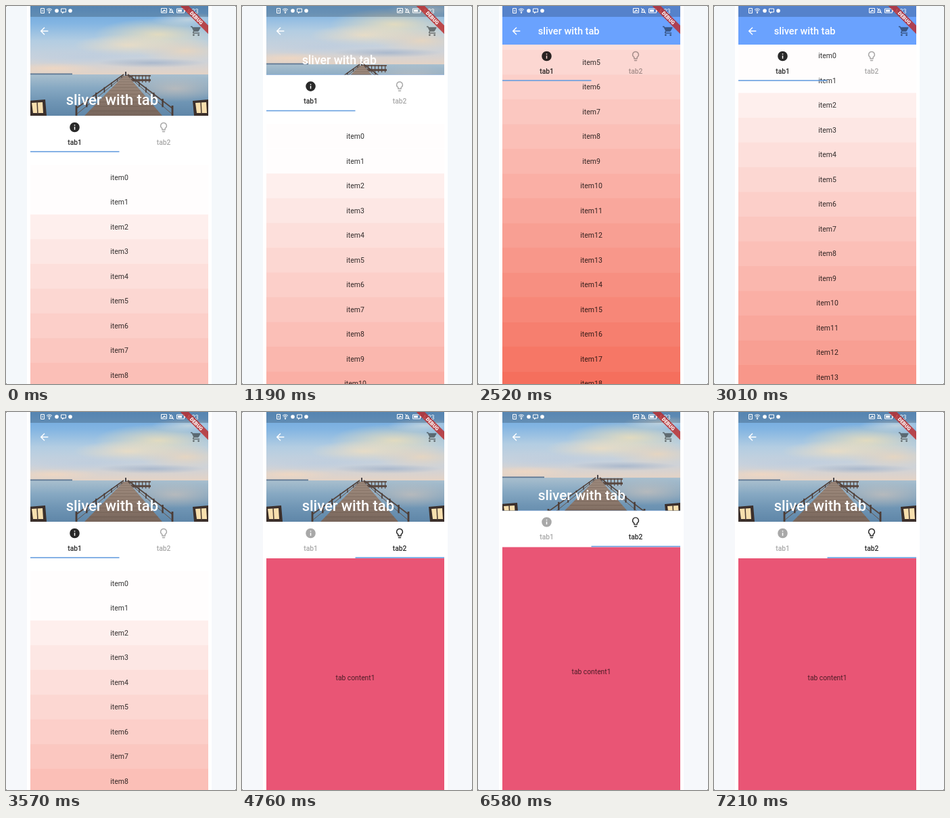
Recreate the animation shown at these times as an HTML page with a canvas. Size 340 by 558 pixels, loop 7.28 s.

```html
<!DOCTYPE html>
<html lang="en">
<head>
<meta charset="utf-8">
<title>Sliver with tab</title>
<style>
html, body { margin: 0; width: 100%; height: 100%; overflow: hidden; background: #f4f8fb; }
canvas { display: block; width: 340px; height: 558px; }
</style>
</head>
<body>
<canvas id="stage"></canvas>
<script>
const LOOP = 7280, W = 340, H = 558;
const L = 36, R = 299, PW = R - L;            // phone edges
const OPEN = 162, SHRINK = 105, TABS = 54, ROW = 36.5;
const FONT = 'Roboto, "Noto Sans", sans-serif';

const canvas = document.getElementById('stage');
const c = canvas.getContext('2d');
const dpr = window.devicePixelRatio || 1;
canvas.width = W * dpr;
canvas.height = H * dpr;

const icons = {
  back: 'M20 11H7.83l5.59-5.59L12 4l-8 8 8 8 1.41-1.41L7.83 13H20z',
  cart: 'M7 18a2 2 0 1 0 0 4 2 2 0 0 0 0-4zM1 2v2h2l3.6 7.59-1.35 2.45A2 2 0 0 0 7 17h12v-2H7.42a.25.25 0 0 1-.22-.37l.9-1.63h7.45c.75 0 1.41-.41 1.75-1.03l3.58-6.49A1 1 0 0 0 20 4H5.21l-.94-2zM17 18a2 2 0 1 0 0 4 2 2 0 0 0 0-4z',
  info: 'M12 2a10 10 0 1 0 0 20 10 10 0 0 0 0-20zM13 17h-2v-6h2zM13 9h-2V7h2z',
  bulb: 'M9 21c0 .55.45 1 1 1h4c.55 0 1-.45 1-1v-1H9zM12 2a7 7 0 0 0-4 12.74V17c0 .55.45 1 1 1h6c.55 0 1-.45 1-1v-2.26A7 7 0 0 0 12 2zM14.85 13.1l-.85.6V16h-4v-2.3l-.85-.6a5 5 0 1 1 5.7 0z'
};
for (const k in icons) icons[k] = new Path2D(icons[k]);

const clamp = (v, a = 0, b = 1) => Math.min(b, Math.max(a, v));
const mix = (a, b, t) => a + (b - a) * t;
const ease = t => t * t * (3 - 2 * t);

// [time, value] pairs, eased in between
function track(keys, t) {
  let [t0, v0] = keys[0];
  for (const [t1, v1] of keys) {
    if (t < t1) return mix(v0, v1, ease(clamp((t - t0) / (t1 - t0))));
    [t0, v0] = [t1, v1];
  }
  return v0;
}
const scrollKeys = [[800, 0], [1600, 125.5], [1750, 125.5], [2400, 352.5], [2580, 352.5],
  [3450, 0], [5230, 0], [5700, 159], [5900, 159], [6750, 0]];
const pageKeys = [[4300, 0], [4600, 1]];

function rect(x, y, w, h, fill) {
  c.fillStyle = fill;
  c.fillRect(x, y, w, h);
}
function poly(fill, ...pts) {
  c.fillStyle = fill;
  c.beginPath();
  for (let i = 0; i < pts.length; i += 2) c.lineTo(pts[i], pts[i + 1]);
  c.fill();
}
function line(color, width, ...pts) {
  c.strokeStyle = color;
  c.lineWidth = width;
  c.beginPath();
  for (let i = 0; i < pts.length; i += 2) c.lineTo(pts[i], pts[i + 1]);
  c.stroke();
}
function dot(x, y, r, fill) {
  c.fillStyle = fill;
  c.beginPath();
  c.arc(x, y, r, 0, 7);
  c.fill();
}
function text(str, x, y, size, weight, fill, align = 'center') {
  c.font = `${weight} ${size}px ${FONT}`;
  c.textAlign = align;
  c.fillStyle = fill;
  c.fillText(str, x, y);
}
function icon(name, x, y, fill) {
  c.save();
  c.translate(x, y);
  c.scale(.73, .73);
  c.translate(-12, -12);
  c.fillStyle = fill;
  c.fill(icons[name], 'evenodd');
  c.restore();
}
function clipTo(x, y, w, h, draw) {
  c.save();
  c.beginPath();
  c.rect(x, y, w, h);
  c.clip();
  draw();
  c.restore();
}
function gradient(y0, y1, ...stops) {
  const g = c.createLinearGradient(0, y0, 0, y1);
  stops.forEach((s, i) => g.addColorStop(i / (stops.length - 1), s));
  return g;
}
function cloud(x, y, rx, ry, rgb, a) {
  c.save();
  c.translate(x, y);
  c.scale(rx, ry);
  const g = c.createRadialGradient(0, 0, 0, 0, 0, 1);
  g.addColorStop(0, `rgba(${rgb},${a})`);
  g.addColorStop(1, `rgba(${rgb},0)`);
  dot(0, 0, 1, g);
  c.restore();
}

function lantern(x) {
  poly('#3b2f2b', x - 13, 140, x + 11, 138, x + 13, 162, x - 11, 162);
  poly('#f7dfae', x - 9, 143, x + 7, 142, x + 8, 158, x - 7, 158);
  line('#4a3a32', 1.5, x - 1, 141, x, 160);
}

function photo() {
  rect(L, 0, PW, 103, gradient(0, 103, '#6aa5dd', '#83b5e2', '#b3cde2', '#c9d2dc', '#e6d3c4'));
  cloud(225, 42, 95, 24, '247,226,180', .75);
  cloud(180, 58, 80, 16, '246,224,190', .7);
  cloud(265, 66, 70, 18, '238,214,186', .8);
  cloud(120, 75, 95, 13, '190,205,222', .8);
  cloud(70, 92, 70, 8, '246,216,190', .7);
  cloud(270, 20, 55, 10, '235,232,220', .6);
  cloud(215, 84, 80, 7, '133,160,196', .5);
  rect(L, 101, PW, 61, gradient(101, 162, '#a9bfce', '#86a8c2', '#6f95b4', '#5f86a8'));
  cloud(250, 122, 70, 20, '220,200,185', .55);
  rect(L, 99.5, 62, 1.8, '#5f7894');

  rect(178, 102, 36, 2, '#6b5a52');
  rect(180, 108, 34, 3, '#5d4c45');
  for (let x = 181; x < 215; x += 5) rect(x, 102, 1.2, 11, '#56463f');

  poly(gradient(103, 162, '#a08d80', '#8f7b6e', '#77655b'), 174, 103, 180, 103, 231, 162, 116, 162);
  for (let i = 1; i < 13; i++) {
    const k = (i / 13) ** 1.6;
    line('rgba(70,55,48,.35)', .7, mix(174, 116, k), 103 + 59 * k, mix(180, 231, k), 103 + 59 * k);
  }
  for (const [near, far] of [[104, 174], [246, 180]]) {
    line('#54443d', 1.6, far, 101, near, 151);
    line('#65534a', 1, far, 103, near, 160);
    for (let i = 1; i < 8; i++) {
      const k = (i / 7) ** 1.6, x = mix(far, near, k);
      line('#4b3c36', .8 + 2 * k, x, 101 + 46 * k, x, 104 + 58 * k);
    }
  }
  rect(176, 97, 2, 6, '#4a4548');
  lantern(47);
  lantern(289);
}

function list(x, top) {
  rect(x, top, PW, H, '#fff');
  for (let i = 0; i < 30; i++) {
    const y = top + 18.7 + i * ROW;
    if (y < -ROW || y > H) continue;
    const fill = i < 2 ? '#fffdfd' : `rgb(${255 - i * .55},${255 - i * 8},${255 - i * 9})`;
    rect(x, y, PW, ROW + .5, fill);
    text('item' + i, x + PW / 2, y + 21.9, 10.5, 400, 'rgba(0,0,0,.8)');
  }
}

function tabs(y, page, hidden) {
  const shade = k => `rgba(0,0,0,${mix(.34, .84, k)})`;
  const idle = hidden ? '#b0a8ab' : shade(1 - page);
  icon('info', 101.5, y + 17, idle);
  icon('bulb', 233, y + 17, shade(page));
  text('tab2', 233, y + 42.5, 10.25, 500, shade(page));
  c.globalAlpha = 1 - hidden;
  text('tab1', 101.5, y + 42.5, 10.25, 500, shade(1 - page));
  rect(L + page * PW / 2, y + 52.2, PW / 2, 1.6, '#68a0e0');
  c.globalAlpha = 1;
}

function statusBar() {
  rect(L, 0, PW, 16, 'rgba(0,0,0,.2)');
  c.lineJoin = 'round';
  c.strokeStyle = '#fff';
  c.lineWidth = 1;
  c.strokeRect(51.5, 3.5, 5, 7);
  rect(53.5, 5.5, 1, 3, '#fff');
  for (const r of [2, 4, 6]) {
    c.beginPath();
    c.arc(64, 10, r, -2.3, -.84);
    c.stroke();
  }
  dot(64, 10, 1, '#fff');
  dot(75, 7, 2.8, '#fff');
  c.strokeRect(81.5, 4, 7, 5);
  poly('#fff', 83, 9, 86, 9, 83, 11.5);
  dot(95, 7, 2.8, '#fff');

  c.strokeRect(229.5, 3.5, 8, 6.5);
  line('#fff', 1.2, 231, 9, 234, 6, 236, 8);
  line('#fff', 1, 241.5, 9.5, 242.5, 8, 242.5, 6, 244, 4, 246, 6, 246, 8, 247, 9.5, 241.5, 9.5);
  line('#fff', 1, 241, 3, 248, 11);
  c.strokeRect(252.5, 4, 11, 6);
  rect(254, 5.5, 6, 3, '#fff');
  rect(264, 6, 1.5, 2, '#fff');
  text('4:23', 276, 10.5, 9, 400, '#fff');
}

function banner() {
  c.save();
  c.translate(R, 0);
  c.rotate(Math.PI / 4);
  rect(-30, 20.4, 60, 8.8, 'rgba(190,40,40,.8)');
  text('DEBUG', 0, 27.4, 7.4, 900, '#fff');
  c.restore();
}

function header(h, p) {
  rect(L, 0, PW, h, '#6aa2fe');
  c.globalAlpha = 1 - clamp((p - .61) / .39);
  if (c.globalAlpha) clipTo(L, 0, PW, h, () => {
    c.translate(0, -26 * p);
    photo();
  });
  c.globalAlpha = 1;
  statusBar();
  icon('back', 56.5, 37, '#fff');
  icon('cart', 281, 37, 'rgba(0,0,0,.47)');
  const size = 14.6 * mix(1.5, 1, p);
  text('sliver with tab', 88.7, h - 11.7 - .2 * size, size, 500, '#fff', 'left');
}

function draw(t) {
  const scroll = track(scrollKeys, t), page = track(pageKeys, t);
  const p = clamp(scroll / SHRINK), h = OPEN - SHRINK * p;
  const top = OPEN + TABS - Math.min(scroll, SHRINK + TABS);
  const under = clamp((scroll - SHRINK) / TABS) * page;

  c.setTransform(dpr, 0, 0, dpr, 0, 0);
  rect(0, 0, W, H, t < 3150 ? '#f4f8fb' : '#f6f8fb');
  rect(31, 0, 273, H, '#fff');
  for (const x of [0, W - 1]) for (const y of [0, H - 1]) rect(x, y, 1, 1, '#777');

  clipTo(L, 0, PW, H, () => {
    if (page < 1) list(L - page * PW, OPEN + TABS - scroll);
    if (page > 0) {
      const x = L + (1 - page) * PW;
      rect(x, top, PW, H - top, '#e95575');
      text('tab content1', x + PW / 2, (top + 568) / 2 + 3.6, 10.3, 400,
        `rgba(0,0,0,${mix(.68, .5, under)})`);
    }
    tabs(h, page, under);
    header(h, p);
    banner();
  });
}

let start;
function frame(now) {
  start ??= now;
  draw((now - start) % LOOP);
  requestAnimationFrame(frame);
}
draw(0);
requestAnimationFrame(frame);
</script>
</body>
</html>
```
